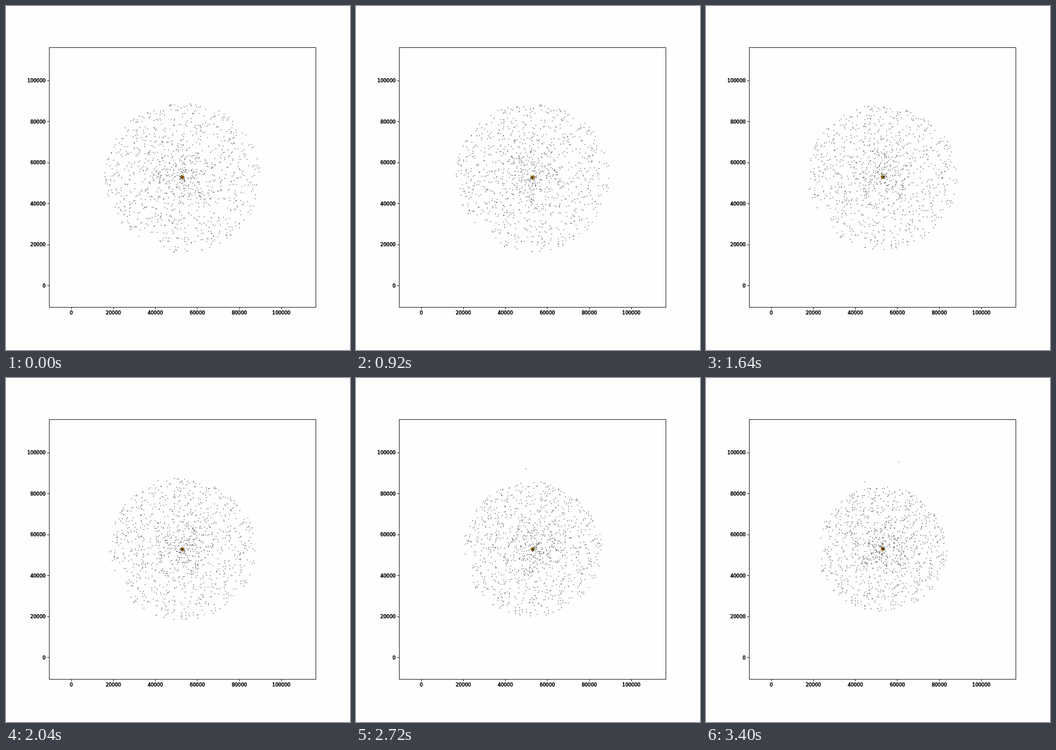
Animation, 600 px wide and 600 px high, one loop 3.44 s. Source, as an HTML page with a canvas:

```html
<!DOCTYPE html>
<html lang="en">
<head>
<meta charset="utf-8">
<title>Rotating particle disc</title>
<style>
  html, body { margin: 0; width: 100%; height: 100%; overflow: hidden; background: #fefefe; }
  svg, canvas { position: absolute; left: 0; top: 0; width: 600px; height: 600px; }
  text { font: 8.33px "DejaVu Sans", sans-serif; stroke: #000; stroke-width: .55px; }
  path, rect { fill: none; stroke: #222; stroke-width: 1; }
</style>
</head>
<body>
<svg id="axes" viewBox="0 0 600 600"><rect x="75.5" y="72.5" width="465" height="453"/></svg>
<canvas id="stage" width="600" height="600"></canvas>
<script>
const STEP = 40, FRAMES = 86, COUNT = 1120;
const CX = 308, CY = 298.2, RX = 136, RY = 131.5;

// Axis ticks and labels
const axes = document.getElementById('axes');
function add(tag, attrs, label = '') {
  const el = document.createElementNS('http://www.w3.org/2000/svg', tag);
  for (const k in attrs) el.setAttribute(k, attrs[k]);
  el.textContent = label;
  axes.append(el);
}
for (let i = 0; i < 6; i++) {
  const x = 114 + 73.25 * i, y = 487.8 - 71.5 * i, label = String(i * 20000);
  add('path', { d: `M${Math.floor(x) + 0.5} 526v3M75 ${Math.floor(y) + 0.5}h-3` });
  add('text', { x, y: 537.8, 'text-anchor': 'middle' }, label);
  add('text', { x: 69, y: y + 3.1, 'text-anchor': 'end' }, label);
}

let seed = 20417;
function rand() {
  seed = (seed + 0x6D2B79F5) | 0;
  let n = Math.imul(seed ^ (seed >>> 15), 1 | seed);
  n = (n + Math.imul(n ^ (n >>> 7), 61 | n)) ^ n;
  return ((n ^ (n >>> 14)) >>> 0) / 4294967296;
}

// Radius and clockwise angle from the top, in a unit disc
const stars = [];
function addStar(r, angle = rand() * 2 * Math.PI) {
  stars.push({ r, angle, phase: rand() * 2 * Math.PI, sway: 0.16 * (1 - r) * rand() });
}
function addGroup(n, reach, power) {
  for (let i = 0; i < n; i++) addStar(reach * Math.pow((i + rand()) / n, power));
}
addGroup(COUNT * 0.86, 1, 0.54);
addGroup(COUNT * 0.13, 0.4, 0.85);
addGroup(COUNT * 0.01, 0.03, 0.6);
addStar(0.998, Math.PI + 0.113);
addStar(0.999, Math.PI + 0.105);

const ctx = document.getElementById('stage').getContext('2d');
function dot(x, y, r) {
  ctx.beginPath();
  ctx.arc(x, y, r, 0, 2 * Math.PI);
  ctx.fill();
}
function polarDot(r, angle) {
  dot(CX + RX * r * Math.sin(angle), CY - RY * r * Math.cos(angle), 0.8);
}

function draw(now) {
  const t = Math.floor(Math.max(0, now) / STEP) % FRAMES * STEP / 1000;
  const scale = 1 - 0.17 * Math.pow(t / 3.4, 2.1);
  const turn = 0.27 * t + 0.0157 * t * t;
  ctx.clearRect(0, 0, 600, 600);
  ctx.fillStyle = '#e59a1c';
  dot(CX, CY + 0.3, 3.2);
  ctx.fillStyle = 'rgba(0, 0, 0, .64)';
  for (const s of stars) {
    // Inner stars circle faster, at about the same linear speed
    const swing = turn / Math.max(s.r, 0.05);
    const r = s.r * scale * (1 + s.sway * Math.sin(s.phase + 1.4 * swing));
    polarDot(r, s.angle + swing);
  }
  // Two stars thrown out of the disc
  polarDot(1.066 + 0.154 * (t - 2.72), -0.08 + 0.38 * (t - 2.72));
  polarDot(0.92 + 0.15 * (t - 3.4), -0.252 + 0.38 * (t - 3.4));
  requestAnimationFrame(draw);
}
draw(performance.now());
</script>
</body>
</html>
```
